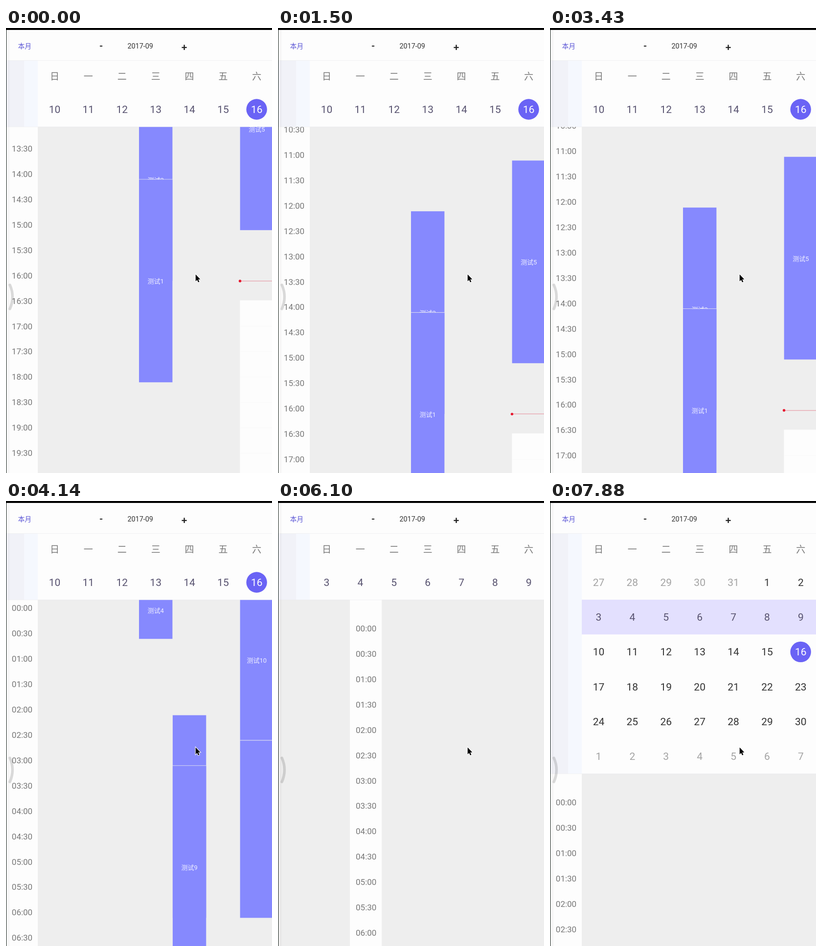
An HTML page with a canvas for the animation above (8 s loop, 544 by 911 pixels).

```html
<!DOCTYPE html>
<html lang="zh">
<head>
<meta charset="utf-8">
<title>Week calendar</title>
<style>
  html, body { margin: 0; width: 100%; height: 100%; overflow: hidden; background: #fdfdfd; }
  canvas { display: block; width: 544px; height: 911px; }
</style>
</head>
<body>
<canvas id="stage"></canvas>
<script>
const W = 544, H = 911, LOOP = 8000;
const COL_X = 65, COL_W = 68.9, PAGE_W = 547;
const HEAD_Y = 202, ROW_H = 71.2, HOUR = 103.84;
const FONT = 'Roboto, "Noto Sans CJK SC", "Noto Sans CJK", sans-serif';
const CJK = '"Noto Sans CJK SC", "Noto Sans CJK", sans-serif';
const PAPER = '#fdfdfd', PAST = '#eeeeee', EVENT = '#8689fe', ACCENT = '#6a63f5';

// day column, start hour, end hour, title
const EVENTS = [
  [3, -0.64, 0.5, '测试4'],
  [6, -0.67, 2.5, '测试10'],
  [6, 2.5, 6, ''],
  [4, 2, 6, '测试8'],
  [4, 3, 7, '测试9'],
  [6, 11, 15, '测试5'],
  [3, 12, 16, '测试2'],
  [3, 14, 18, '测试1'],
  [2, 20.5, 24.5, '测试3'],
  [5, 21.5, 25.5, '测试7']
];

// start ms, steps, target value, ease-in power, ease-out power
const SCROLL = [
  [90, 13, -880, 2, 3],
  [1410, 10, -1375, 4, 3],
  [2640, 10, -890, 2.77, 2],
  [3520, 10, 261, 1.8, 3]
];
const WEEK = [
  [5120, 5, -1, 1.3, 2.38],
  [6100, 5, -2, 1.3, 2.38],
  [6900, 4, -1, 1.3, 2.4]
];
const EXPAND = [[7610, 4, 1, 3, 10.6]];

const canvas = document.getElementById('stage');
const ctx = canvas.getContext('2d');
const dpr = window.devicePixelRatio || 1;
canvas.width = W * dpr;
canvas.height = H * dpr;

// The screen refreshes about every 88 ms, so motion is sampled in steps.
function track(moves, value, t) {
  for (const [start, steps, to, a, b] of moves) {
    if (t < start) break;
    const u = Math.min(1, (Math.floor((t - start + 4) / 88) + 1) / steps);
    value += (to - value) * (1 - (1 - u ** a) ** b);
  }
  return value;
}

function rect(color, x, y, w, h) {
  ctx.fillStyle = color;
  ctx.fillRect(x, y, w, h);
}

function disc(color, x, y, r) {
  ctx.fillStyle = color;
  ctx.beginPath();
  ctx.arc(x, y, r, 0, 7);
  ctx.fill();
}

// Draws text centred on x and y; lift is the glyph centre above the baseline in em.
function label(str, x, y, size, color, family = FONT, lift = 0.355, weight = 400) {
  ctx.font = `${weight} ${size}px ${family}`;
  ctx.fillStyle = color;
  ctx.fillText(str, x, y + size * lift);
}

function clipped(x, y, w, h, draw) {
  ctx.save();
  ctx.beginPath();
  ctx.rect(x, y, w, h);
  ctx.clip();
  draw();
  ctx.restore();
}

const dayX = c => COL_X + COL_W * (c + 0.5);

function drawToday(y) {
  const now = y + 11.3 + 16 * HOUR, open = y + 16.5 * HOUR - 1;
  const satX = COL_X + 6 * COL_W;
  rect(PAPER, satX, open, COL_W, H * 3);
  for (let h = 17; h < 24; h += 0.5) rect('#f9f9f9', satX, Math.round(y + h * HOUR), COL_W, 1);
  for (const [c, from, to, title] of EVENTS) {
    const x = COL_X + c * COL_W, top = y + 11 + from * HOUR, h = (to - from) * HOUR;
    rect(PAST, x, top - 0.5, COL_W, 1);
    rect(EVENT, x + 0.3, top + 0.5, COL_W - 0.5, h - 0.5);
    label(title, dayX(c), top + h / 2 + 1, 13, 'rgba(255,255,255,.88)', FONT, 0.37);
  }
  rect('#e58b99', satX, Math.round(now) - 0.5, COL_W, 1);
  disc('#e6192f', satX + 0.2, now, 2.7);
}

function drawPage(week, x, y) {
  ctx.save();
  ctx.translate(x, 0);
  rect(PAPER, 0, 0, COL_X, H);
  rect(PAST, COL_X, 0, PAGE_W - COL_X, H);
  if (week === 0) drawToday(y);
  for (let i = 0; i < 48; i++) {
    const hh = String(i >> 1).padStart(2, '0');
    label(`${hh}:${i % 2 ? '30' : '00'}`, 33, y + i * HOUR / 2, 17, '#777777');
  }
  ctx.restore();
}

function drawWeekRow(week, y, selected) {
  for (let c = 0; c < 7; c++) {
    const date = new Date(2017, 8, 10 + 7 * week + c);
    const today = week === 0 && c === 6;
    let color = date.getMonth() === 8 ? '#333333' : '#a3a3a3';
    if (selected) color = '#57526f';
    if (today) {
      disc(ACCENT, dayX(c) - 0.2, y, 21.2);
      color = '#ffffff';
    }
    label(date.getDate(), dayX(c), y, 21, color);
  }
}

function drawHeader(week, open) {
  const bottom = HEAD_Y + 5 * ROW_H * open;
  rect(PAPER, 0, 0, W, bottom);
  rect('#f1f2f8', 0, 67, 37, bottom - 67);
  rect('#f5f8fe', 37, 67, 28, bottom - 67);
  rect('#f0f0f2', 0, 66, W, 1);

  label('本月', 38.3, 36.5, 13.8, '#5d58d6', CJK, 0.38);
  label('-', 194.5, 38, 20, '#222222', FONT, 0.27, 500);
  label('2017-09', 274.7, 36.5, 14.4, '#333333');
  label('+', 364.5, 39.5, 21, '#222222', FONT, 0.33, 500);
  [...'日一二三四五六'].forEach((d, c) => label(d, dayX(c), 98.5, 19, '#777777', CJK, 0.38));

  clipped(COL_X, 131, W - COL_X, bottom - 131, () => {
    if (!open) return drawWeekRow(week, 166.5, true);
    const shift = (open - 1) * ROW_H;
    rect('#e3e0fe', COL_X, 202 + shift, W, ROW_H);
    for (let r = 0; r < 6; r++) drawWeekRow(r - 2, 166.5 + r * ROW_H + shift, r - 2 === week);
  });
  rect('#ececee', 0, bottom, W, 0.6);
}

function drawOverlay() {
  rect('rgba(60,20,40,.02)', 1, 4, 7, H);
  rect('#16231d', 0, 0, 1, H);
  rect('#000000', 0, 0, W, 4);

  // edge handle
  ctx.strokeStyle = 'rgba(0,0,0,.14)';
  ctx.lineWidth = 5.5;
  ctx.lineCap = 'round';
  ctx.beginPath();
  ctx.moveTo(8, 526);
  ctx.quadraticCurveTo(18.5, 550, 8, 575);
  ctx.stroke();

  // pointer
  ctx.beginPath();
  [[0, 0], [0, 14], [3.1, 11.2], [5.3, 16], [7.6, 15], [5.4, 10.3], [9.6, 10]]
    .forEach(([x, y]) => ctx.lineTo(387.8 + x, 504.5 + y));
  ctx.closePath();
  ctx.lineWidth = 2;
  ctx.strokeStyle = '#ffffff';
  ctx.stroke();
  ctx.fillStyle = '#000000';
  ctx.fill();
}

function draw(t) {
  const scroll = track(SCROLL, -1154.8, t);
  const pos = track(WEEK, 0, t);
  const open = track(EXPAND, 0, t);
  const drop = 5 * ROW_H * open;

  ctx.setTransform(dpr, 0, 0, dpr, 0, 0);
  ctx.textAlign = 'center';
  rect(PAPER, 0, 0, W, H);
  clipped(0, HEAD_Y + drop, W, H, () => {
    const first = Math.floor(pos), last = Math.ceil(pos);
    for (let w = first; w <= last; w++) drawPage(w, (w - pos) * PAGE_W, scroll + drop);
  });
  drawHeader(Math.round(pos), open);
  drawOverlay();
}

function frame() {
  draw(performance.now() % LOOP);
  requestAnimationFrame(frame);
}
frame();
</script>
</body>
</html>
```
